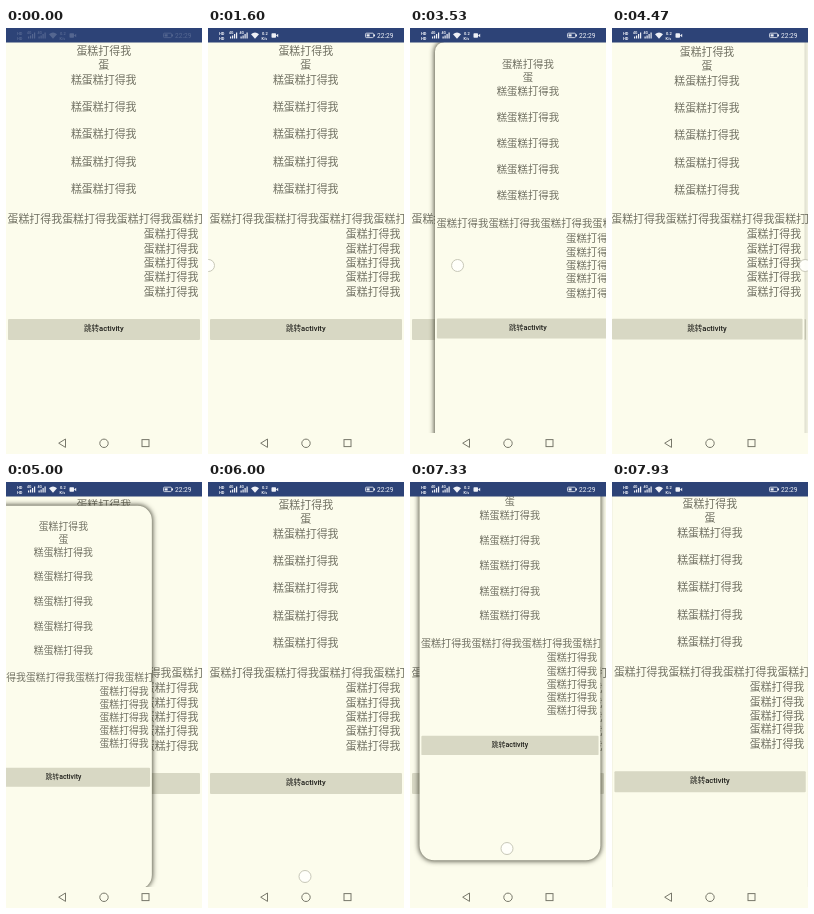
These frames come from a looping animation (196x426 px, 8 s). An HTML page:

```html
<!DOCTYPE html>
<html lang="zh-CN">
<head>
<meta charset="utf-8">
<title>Swipe back</title>
<style>
html, body { margin: 0; width: 100%; height: 100%; overflow: hidden; background: #fcfcec; }
#stage { position: relative; width: 196px; height: 426px; overflow: hidden; }
#stage, .page { background: #fcfcec; }
.page {
  position: absolute; left: 0; top: 0; width: 196px; height: 426px;
  overflow: hidden; transform-origin: 0 0;
  font: 10.95px/14px "Noto Sans CJK SC", "Noto Sans CJK", sans-serif; color: #727264;
}
.page div { position: absolute; white-space: nowrap; }
.mid { left: 0; width: 195.5px; text-align: center; }
.long { left: 1.5px; }
.end { right: 3.5px; }
.page .btn {
  left: 1.5px; top: 291px; width: 192.5px; height: 20.5px; border-radius: 1px;
  background: #d8d8c4; color: #1c1c18; text-align: center;
  font: 500 7.6px/20.5px Roboto, "Noto Sans CJK SC", sans-serif;
}
#rule { position: absolute; top: 286.5px; width: 196px; height: 1px; background: #96968a; }
#touch {
  position: absolute; left: -6.5px; top: -6.5px; width: 13px; height: 13px; box-sizing: border-box;
  border-radius: 50%; border: .8px solid #c8c8b8; background: rgba(255,255,252,.9);
}
svg { position: absolute; left: 0; top: 0; }
</style>
</head>
<body>
<div id="stage">
  <div class="page" id="back"></div>
  <div id="rule"></div>
  <div class="page" id="front"></div>
  <svg width="196" height="426" font-family="Roboto, sans-serif">
    <rect width="196" height="14.5" fill="#2d4377"/>
    <g id="status" fill="#eef0f6">
      <g font-size="4" font-weight="700">
        <text x="11" y="6.5">HD</text><text x="11" y="11.8">HD</text>
        <text x="21" y="5.5" font-size="3.5">4G</text><text x="31.5" y="5.5" font-size="3.5">4G</text>
        <text x="54" y="6.6">0.2</text><text x="53.5" y="11.6" font-size="3.8">K/s</text>
      </g>
      <path id="bars" d="M22 10.5v-2h1.2v2zM24 10.5v-3h1.2v3zM26 10.5v-4.4h1.2v4.4zM28 10.5v-6h1.2v6z"/>
      <use href="#bars" x="10.5"/>
      <path d="M43 6.2q4-3.4 8 0l-4 4.6z"/>
      <rect x="63.5" y="5.3" width="4.5" height="4.4" rx=".8"/><path d="M68 7.5l2.2-1.8v3.6z"/>
      <rect x="157.5" y="5.2" width="8" height="4.4" rx="1" fill="none" stroke="#eef0f6" stroke-width=".8"/>
      <rect x="158.6" y="6.3" width="3" height="2.2"/><rect x="166" y="6.4" width="1" height="2"/>
      <text x="169" y="9.9" font-size="6.6">22:29</text>
    </g>
    <rect y="405" width="196" height="21" fill="#fcfcec"/>
    <g fill="none" stroke="#77776a">
      <path d="M59.5 411v8.4l-6.8-4.2z" stroke-linejoin="round"/>
      <circle cx="98" cy="415.3" r="4.2"/>
      <rect x="136" y="411.6" width="7" height="7"/>
    </g>
  </svg>
  <div id="touch"></div>
</div>
<script>
const LOOP = 8000, W = 196, H = 426, LAG = 130;
const $ = id => document.getElementById(id);
const word = '蛋糕打得我';
const row = (cls, y, text) => `<div class="${cls}" style="top:${y - 7.6}px">${text}</div>`;
const rows = (cls, y, step, text) => [0, 1, 2, 3, 4].map(i => row(cls, y + i * step, text)).join('');

$('back').innerHTML = $('front').innerHTML =
  row('mid', 22.5, word) + row('mid', 37, '蛋') +
  rows('mid', 51.2, 27.35, '糕' + word) +
  row('long', 191, word.repeat(4)) +
  rows('end', 206, 14.35, word) +
  '<div class="btn">跳转activity</div>';

// Each swipe pulls the page `peak` px off its edge and lets it return;
// the finger travels `reach` px and lifts at the given share of the pull.
const swipes = [
  { side: 'left', start: 1600, end: 2930, peak: 42, reach: 44, lift: .6, rule: true },
  { side: 'left', start: 3070, end: 3800, peak: 25.5, reach: 48, lift: .65 },
  { side: 'right', start: 4270, end: 5730, peak: 51, reach: 50, lift: .43 },
  { side: 'bottom', start: 5870, end: LOOP, peak: 59, reach: 34.6, lift: .75 }
];

// Page placement [x, y, scale] at pull distance d
const place = {
  left: d => [d, .558 * d, 1 - d / 505],
  right: d => [W - d - W * (1 - d / 505), .473 * d, 1 - d / 505],
  bottom: d => [.2 * d, H - d - H * (1 - d / 618), 1 - d / 618]
};
const finger = {
  left: r => [r, 237],
  right: r => [W - r, 237],
  bottom: r => [96.5, 394 - r]
};

const clamp = v => Math.min(1, Math.max(0, v));

function draw(t) {
  const swipe = swipes.find(k => t >= k.start && t < k.end);
  const u = swipe ? clamp((t - swipe.start - LAG) / (swipe.end - swipe.start - LAG)) : 0;
  const swing = Math.sin(Math.PI * u) ** 1.5;
  const d = swipe ? swipe.peak * swing : 0;

  const [x, y, s] = place[swipe ? swipe.side : 'left'](d);
  const front = $('front').style;
  front.transform = `translate(${x}px, ${y}px) scale(${s})`;
  front.borderRadius = Math.min(16, d * .4) + 'px';
  front.boxShadow = `0 0 6px 1px rgba(40,40,25,${clamp(d / 12) * .8})`;
  $('rule').hidden = !(swipe && swipe.rule);

  const touching = swipe && u < swipe.lift;
  $('touch').hidden = !touching;
  if (touching) {
    const [fx, fy] = finger[swipe.side](swipe.reach * swing);
    $('touch').style.transform = `translate(${fx}px, ${fy}px)`;
  }
  $('status').setAttribute('opacity', .2 + .8 * clamp((t - 70) / 200));
}

const start = performance.now();
function tick() {
  draw((performance.now() - start) % LOOP);
  requestAnimationFrame(tick);
}
tick();
</script>
</body>
</html>
```
